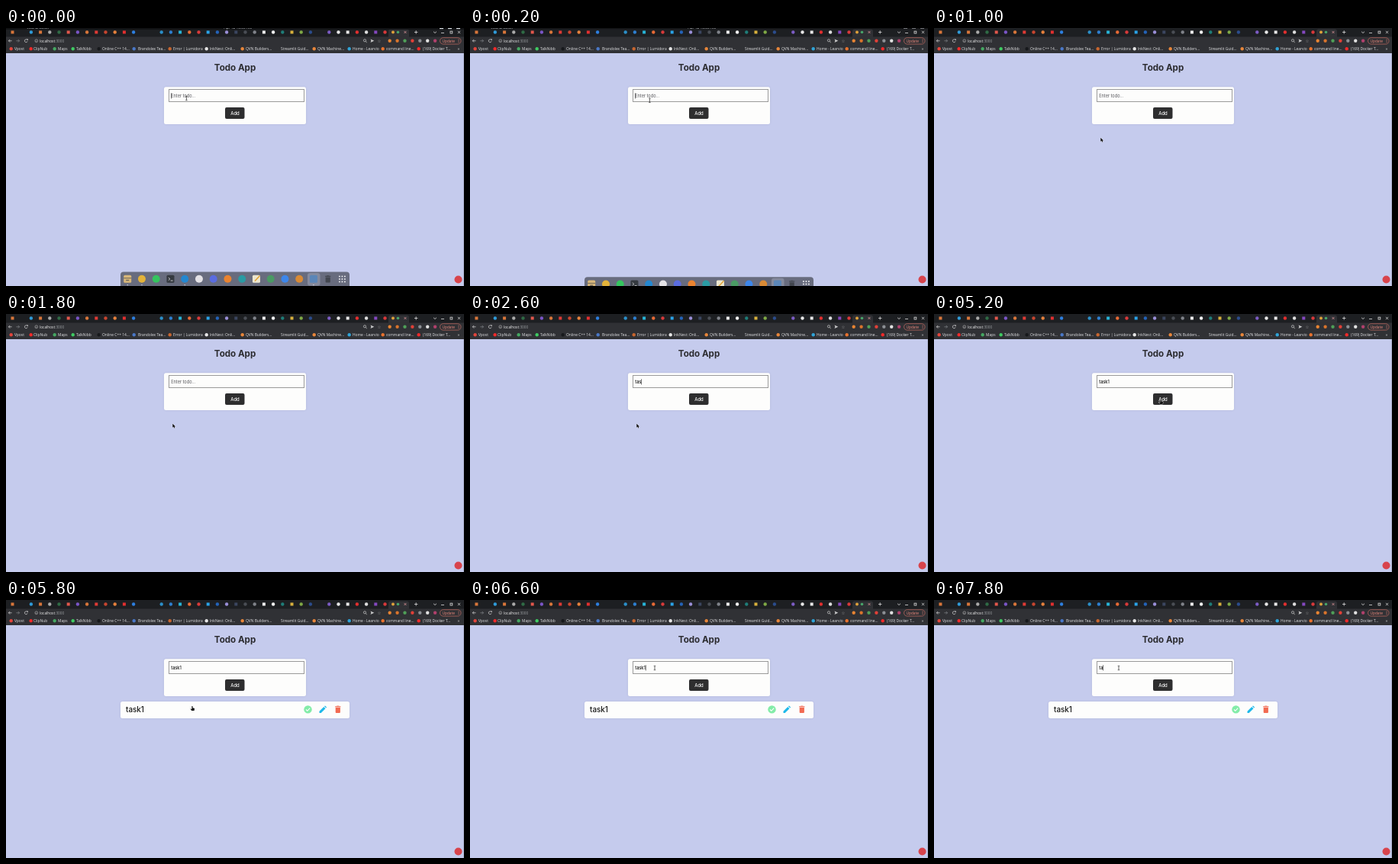
Recreate the animation shown at these times as an HTML page with a canvas. Size 600 px wide and 338 px high, loop 8000 ms.

```html
<!DOCTYPE html>
<html lang="en">
<head>
<meta charset="utf-8">
<title>Todo App</title>
<style>
html, body { margin: 0; width: 100%; height: 100%; overflow: hidden; background: #c5cbed; }
canvas { display: block; width: 600px; height: 338px; }
</style>
</head>
<body>
<canvas id="stage"></canvas>
<script>
const LOOP = 8000, STEP = 100;
const UI = 'Inter, sans-serif', CHROME = '"Open Sans", sans-serif';
const canvas = document.getElementById('stage');
const dpr = window.devicePixelRatio || 1;
canvas.width = Math.round(600 * dpr);
canvas.height = Math.round(338 * dpr);
const c = canvas.getContext('2d', { alpha: false });

function box(x, y, w, h, color, r = 0) {
  c.fillStyle = color;
  c.beginPath();
  c.roundRect(x, y, w, h, r);
  c.fill();
}

function dot(x, y, r, color) {
  c.fillStyle = color;
  c.beginPath();
  c.arc(x, y, r, 0, Math.PI * 2);
  c.fill();
}

function ring(x, y, r, color, width, from = 0, to = Math.PI * 2) {
  c.strokeStyle = color;
  c.lineWidth = width;
  c.beginPath();
  c.arc(x, y, r, from, to);
  c.stroke();
}

function line(points, color, width = 0.8) {
  c.strokeStyle = color;
  c.lineWidth = width;
  c.beginPath();
  points.forEach(([x, y], i) => i ? c.lineTo(x, y) : c.moveTo(x, y));
  c.stroke();
}

function poly(points, color) {
  c.fillStyle = color;
  c.beginPath();
  points.forEach(([x, y]) => c.lineTo(x, y));
  c.closePath();
  c.fill();
}

function text(str, x, y, size, color, weight = 400, family = UI, align = 'left') {
  c.font = `${weight} ${size}px ${family}`;
  c.fillStyle = color;
  c.textAlign = align;
  c.fillText(str, x, y);
}

// Browser window

const TABS = ('#d9763a - #2f9bd8 #d9763a #aaa #2f6b45 #e2574c #7a55c7 #d9763a #e03a35 #c8452f ' +
  '#e5803c #e22f2f #2d7fe0 - - #2b8fc9 #2d7fd0 #27b5d9 #e86a35 #d83a3a #2aa3e8 #2463b8 ' +
  '#9a8fd8 #3b4660 #4a4e55 #80838a #f2f2f2 #f2f2f2 #1f7d78 #d8b13c #7fa845 #2b4c8c - ' +
  '#7c5cc4 #e8e8e8 #e8e8e8 #e22f2f #ddd #8448c0 #d8383a').split(' ');

const BOOKMARKS = [
  [6, 11, 'Vpost', '#e2453c'],
  [32, 36, 'ClipNub', '#f02a2a'],
  [63, 68, 'Maps', '#45a862'],
  [87, 92, 'TalkNibb', '#3fcb62'],
  [121, 126, 'Online C++ 14...', '#17191c'],
  [167, 173, 'Brandolex Tea...', '#4a78c8'],
  [214, 219, 'Error | Lumidora', '#c8662f'],
  [262, 267, 'InkNest: Onli...', '#e6e6e6'],
  [309, 314, 'QVN Builders...', '#e8863a'],
  [0, 360, 'Streamlit Guid...', ''],
  [403, 408, 'QVN Machine...', '#e8863a'],
  [449, 454, 'Home - Learvio', '#2fa4d8'],
  [493, 498, 'command line...', '#e8722e'],
  [540, 546, '(169) Docker T...', '#f02a2a']
];

const EXTENSIONS = ['#e88432', '#d9742c', '#4f9f58', '#e04038', '#8c8f94', '#e0e0e0', '#b0406c'];

function cross(x, y, r, color) {
  line([[x - r, y - r], [x + r, y + r]], color);
  line([[x - r, y + r], [x + r, y - r]], color);
}

function tabStrip() {
  box(0, 0, 600, 12, '#1d1f22');
  box(501, 1.5, 27, 11, '#303135', [3, 3, 0, 0]);
  TABS.forEach((color, i) => {
    const x = 8.5 + i * 12.2;
    if (color !== '-') i % 3 ? dot(x, 5.5, 2.2, color) : box(x - 2, 3.5, 4, 4, color);
  });
  dot(507, 5.5, 2, '#e0a23a');
  dot(513.5, 5.5, 1.8, '#48a56a');
  cross(523, 5.5, 1.4, '#e59a9e');
  line([[535, 5.5], [539.4, 5.5]], '#ddd');
  line([[537.2, 3.3], [537.2, 7.7]], '#ddd');
  line([[560, 4.7], [562, 6.6], [564, 4.7]], '#ddd');
  line([[570, 6.5], [574, 6.5]], '#ddd');
  c.strokeRect(582, 4.2, 2.8, 2.8);
  cross(593.5, 5.5, 1.6, '#ddd');
}

function arrow(x, y, dir, color) {
  line([[x - 2.1, y], [x + 2.1, y]], color, 0.7);
  line([[x + dir * 0.3, y - 1.8], [x + dir * 2.1, y], [x + dir * 0.3, y + 1.8]], color, 0.7);
}

function toolbar() {
  box(0, 11.5, 600, 21.5, '#303135');
  arrow(5.5, 16.8, -1, '#ddd');
  arrow(15.5, 16.8, 1, '#85878b');
  ring(26.3, 16.8, 1.9, '#ddd', 0.7, 0.3, 5.4);
  poly([[26.8, 14.4], [28.8, 14.4], [28.8, 16.4]], '#ddd');
  ring(39.8, 16.8, 1.9, '#bbb', 0.6);
  box(39.5, 16.4, 0.6, 1.5, '#bbb');
  text('localhost', 44, 18.6, 4.8, '#f0f0f0', 400, CHROME);
  const w = c.measureText('localhost').width;
  text(':3000', 44 + w, 18.6, 4.8, '#9a9da1', 400, CHROME);

  ring(470, 16.3, 1.6, '#ccc', 0.7);
  line([[471.2, 17.5], [472.8, 19]], '#ccc');
  poly([[477.5, 14.6], [482.3, 16.8], [477.5, 19], [478.4, 16.8]], '#ccc');
  text('☆', 489, 18.8, 5.5, '#aaa', 400, '"DejaVu Sans", sans-serif', 'center');
  EXTENSIONS.forEach((color, i) => dot(502.7 + i * 9.9, 16.8, 2.2, color));
  c.strokeStyle = '#e07468';
  c.lineWidth = 0.6;
  c.beginPath();
  c.roundRect(568.5, 12.7, 27.5, 8.4, 4.2);
  c.stroke();
  text('Update', 571.5, 18.6, 4.8, '#f08a7d', 500, CHROME);
  for (let i = -1; i < 2; i++) dot(593, 16.8 + i * 1.8, 0.5, '#f08a7d');
}

function bookmarks() {
  for (const [ix, tx, name, color] of BOOKMARKS) {
    if (color) dot(ix + 0.7, 27.2, 2.2, color);
    text(name, tx, 29, 4.9, '#e4e5e7', 400, CHROME);
  }
  text('»', 591.5, 28.8, 5.5, '#ccc', 400, CHROME);
}

// Page

function card(x, y, w, h) {
  c.shadowColor = 'rgba(70,70,110,.12)';
  c.shadowBlur = 3 * dpr;
  box(x, y, w, h, '#fdfdfc', 2.5);
  c.shadowBlur = 0;
  c.shadowColor = 'transparent';
}

function form(value, caret) {
  text('Todo App', 300, 55.7, 11.6, '#2c2c30', 700, UI, 'center');
  card(207, 77.3, 186, 48.7);
  c.strokeStyle = '#9a9a9a';
  c.lineWidth = 1;
  c.strokeRect(213.5, 80.5, 177, 16);
  text(value || 'Enter todo...', 216.2, 90.8, 5.6, value ? '#111' : '#55555a', value ? 500 : 400);
  const w = value ? c.measureText(value).width : 0;
  if (caret) box(216.3 + w, 85.2, 0.6, 7.4, '#111');
  box(287, 104, 25.5, 15, '#2e2e2f', 2);
  text('Add', 300, 113.6, 6, '#fafafa', 500, UI, 'center');
}

function todoRow() {
  card(150, 133, 300, 22);
  text('task1', 157, 147, 9.9, '#161616', 500);
  dot(395.5, 143.4, 5.2, '#83eca8');
  line([[393, 143.5], [394.8, 145.3], [398.2, 141.6]], '#fff', 1.1);
  poly([[410.5, 148], [410.5, 145.8], [416.3, 140], [418.5, 142.2], [412.7, 148]], '#1fb9ea');
  poly([[417, 139.3], [418, 138.4], [420.1, 140.5], [419.2, 141.5]], '#1fb9ea');
  trash(434.8, 143.3, '#f26a52');
}

function trash(x, y, color) {
  box(x - 3.6, y - 4.1, 7.2, 1.2, color);
  box(x - 1.5, y - 4.7, 3, 0.8, color);
  box(x - 3.1, y - 2.3, 6.2, 7, color, [0, 0, 1, 1]);
}

// Desktop shell

const DOCK = ['#d8b77a', '#e4b33a', '#35c45f', '#353a40', '#2487d0', '#e4e2e6', '#5a6ce0', '#ea8330',
  '#2a9ba3', '#ece6cf', '#4a9a64', '#3d86ea', '#d98a35', '#5b86b8', ''];

function dock(shift) {
  c.save();
  c.translate(0, shift);
  box(150, 319.5, 300, 22, '#686c7e', [4, 4, 0, 0]);
  box(395, 321, 16.5, 16.5, '#858a9d', 3);
  DOCK.forEach((color, i) => {
    const x = 159.2 + i * 18.75;
    if ([0, 3, 9, 13].includes(i)) box(x - 5, 323.8, 10, 10, color, 1.5);
    else if (color) dot(x, 328.8, 5, color);
    if ([0, 1, 4, 13].includes(i)) dot(x, 336.6, 0.7, '#f0f0f4');
  });
  box(154.2, 327.2, 10, 1, '#6d6658');
  box(157.2, 329.8, 4, 1.4, '#6d6658');
  line([[212.8, 327], [214.8, 328.8], [212.8, 330.6]], '#eee', 0.8);
  line([[215.6, 331], [218.6, 331]], '#eee', 0.8);
  line([[326, 331.5], [332.5, 324.5]], '#e0a030', 1.4);
  trash(421.7, 328.8, '#42464f');
  for (let i = 0; i < 9; i++) dot(436.9 + i % 3 * 3.5, 325.4 + Math.floor(i / 3) * 3.5, 0.95, '#f2f2f5');
  c.restore();
}

function topPanel(shift) {
  c.save();
  c.translate(0, -shift);
  box(0, 0, 600, 2, '#101113');
  c.beginPath();
  c.rect(0, 0, 600, 2);
  c.clip();
  text('Web Browser', 27, 1.4, 4.8, '#d8dce2', 400, CHROME);
  text('Apr 12 10:30 AM', 304, 1.4, 4.8, '#d8dce2', 400, CHROME, 'center');
  for (const x of [568, 579, 590]) box(x, 0, 5, 1.2, '#d8dce2');
  c.restore();
}

// Pointer

const PATH = [
  [0, 236.4, 92], [100, 236.4, 92], [800, 218.3, 143.8], [4400, 218.3, 143.8], [5100, 297, 112],
  [5450, 297, 112], [5750, 244, 139], [5900, 244, 139], [6500, 242, 89], [8000, 242, 89]
];

function pointerAt(t) {
  const i = PATH.findIndex(p => p[0] > t);
  const [t0, x0, y0] = PATH[i - 1], [t1, x1, y1] = PATH[i];
  const k = (t - t0) / (t1 - t0), e = k * k * (3 - 2 * k);
  return [x0 + (x1 - x0) * e, y0 + (y1 - y0) * e];
}

function pointer(t) {
  const [x, y] = pointerAt(t);
  const inside = (l, top, r, b) => x > l && x < r && y > top && y < b;
  c.save();
  c.translate(x, y);
  if (inside(214, 81, 391, 97)) {
    line([[0, -2.6], [0, 2.6]], '#222', 0.7);
    line([[-1.3, -2.7], [1.3, -2.7]], '#222', 0.6);
    line([[-1.3, 2.7], [1.3, 2.7]], '#222', 0.6);
  } else if (inside(287, 104, 313, 119) || (t >= ROW_TIME && inside(150, 133, 450, 155))) {
    const hand = [[-0.6, 0], [0.5, 0], [0.6, 2.2], [3, 2.9], [2.6, 6], [-0.8, 6], [-2.6, 3.4], [-0.6, 3.9]];
    line([...hand, hand[0]], '#f2f2f2', 0.8);
    poly(hand, '#151515');
  } else {
    const tip = [[0, 0], [0, 5], [1.2, 4], [2.1, 5.8], [3, 5.4], [2.2, 3.7], [3.7, 3.6]];
    line([...tip, tip[0]], '#eef0fa', 0.7);
    poly(tip, '#111');
  }
  c.restore();
}

// Timeline

const ROW_TIME = 5500;
const TYPING = [
  [0, ''], [2200, 't'], [2400, 'ta'], [2600, 'tas'], [2900, 'task'], [3300, 'task1'],
  [6600, 'task1'], [6700, 'task'], [6800, 'tas'], [7000, 'ta'], [7100, 't'], [7200, ''],
  [7500, 't'], [7700, 'ta']
];

function draw(t) {
  const [since, value] = TYPING.filter(k => k[0] <= t).pop();
  const focused = t < 5400 || t >= 6600;
  const caret = focused && (t - since) % 1200 < 600;
  const hide = Math.min(1, Math.max(0, (t - 100) / 300));

  c.setTransform(canvas.width / 600, 0, 0, canvas.height / 338, 0, 0);
  box(0, 0, 600, 338, '#c5cbed');
  box(599, 33, 1, 305, '#a3a8c4');
  tabStrip();
  toolbar();
  bookmarks();
  form(value, caret);
  if (t >= ROW_TIME) todoRow();
  if (hide < 1) {
    dock(hide * 20);
    topPanel(hide * 2);
  }
  dot(592.5, 329.5, 5, '#d8444c');
  pointer(t);
}

const start = performance.now();
function tick() {
  const t = (performance.now() - start) % LOOP;
  draw(Math.floor(t / STEP) * STEP);
  requestAnimationFrame(tick);
}
tick();
</script>
</body>
</html>
```
